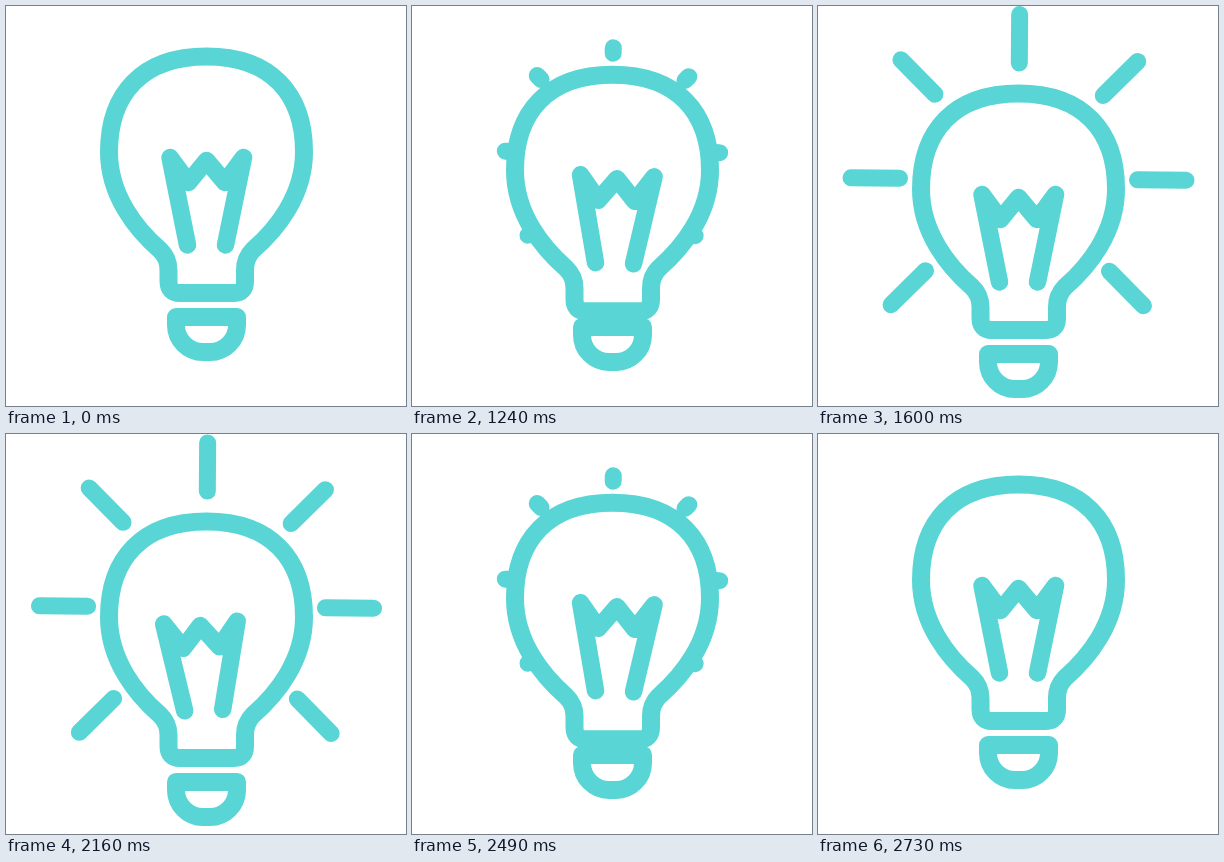
An HTML page that plays this animation: 400x400 px, repeating every 2760 ms.

```html
<!DOCTYPE html>
<html lang="en">
<head>
<meta charset="utf-8">
<title>Light bulb</title>
<style>
  html, body { margin: 0; width: 100%; height: 100%; overflow: hidden; background: #fff; }
  svg { display: block; width: 100%; height: 100%; }
  path { fill: none; stroke: #58d5d4; stroke-width: 18; stroke-linecap: round; stroke-linejoin: round; }
  #rays { stroke-width: 17; }
  #filament { stroke-width: 17.5; }
  #glass { fill: #fff; }
</style>
</head>
<body>
<svg viewBox="0 0 400 400">
  <path id="rays"/>
  <path id="base" d="M170 311H231V319A27 27 0 0 1 204 346H197A27 27 0 0 1 170 319Z"/>
  <g id="bulb">
    <path id="glass" d="M200.5 50.5C136 50.5 103 88 103 146C103 190 131 224 154 244
      Q162.5 252 162.5 264V275Q162.5 287 174 287H228Q239 287 239 275V264Q239 252 247 244
      C270 224 298 190 298 146C298 88 265 50.5 200.5 50.5Z"/>
    <path id="filament" d="M181.5 239L164 151.5L182.5 176.5L200.5 154.5L219 176.5L237.5 151.5L219.5 239"/>
  </g>
</svg>
<script>
  const LOOP = 2760, STEP = 30, STEPS = 20, DROP = 37;
  const OPEN_AT = 1000, CLOSE_AT = 2130;
  const CENTER = { x: 200.5, y: 136 };
  // direction in degrees and extra distance from the centre
  const RAYS = [[-180, 0], [-135, 0], [-90, -3], [-45, 0], [0, 0], [45, 10.5], [135, 11.5]];

  const [rays, base, bulb, filament] =
    ['rays', 'base', 'bulb', 'filament'].map(id => document.getElementById(id));

  const clamp = (v, lo, hi) => Math.min(hi, Math.max(lo, v));
  const smooth = p => p * p * (3 - 2 * p);
  const easeInOut = (p, n) => p < 0.5 ? (2 * p) ** n / 2 : 1 - (2 - 2 * p) ** n / 2;
  const stepsSince = (t, start) => clamp(Math.floor((t - start) / STEP), 0, STEPS);

  // Rays shoot out from the centre, slowing down, hidden by the glass at first.
  function rayPath(p, dy) {
    const left = (1 - p) ** 2;
    const outer = 167.5 * (1 - left);
    const inner = Math.min(outer, 119 - 48 * left);
    return RAYS.map(([deg, extra]) => {
      const a = (deg + 0.4) * Math.PI / 180;
      const point = r =>
        `${CENTER.x + (r + extra) * Math.cos(a)} ${CENTER.y + dy + (r + extra) * Math.sin(a)}`;
      return `M${point(inner)}L${point(outer)}`;
    }).join('');
  }

  function draw(now) {
    const t = now % LOOP;
    const u = stepsSince(t, OPEN_AT) - stepsSince(t, CLOSE_AT);
    const p = u / STEPS;
    const bulbDrop = DROP * smooth(Math.min(1, u / 13) ** 1.45);
    const baseDrop = DROP * easeInOut(p, 2.8);
    const tilt = (0.94 + 2 * p) * Math.sin(6 * Math.PI * p);

    bulb.setAttribute('transform', `translate(0 ${bulbDrop})`);
    base.setAttribute('transform', `translate(0 ${baseDrop})`);
    filament.setAttribute('transform', `rotate(${tilt} 200.5 309)`);
    rays.setAttribute('d', rayPath(p, baseDrop));
  }

  const start = performance.now();
  function tick() {
    draw(performance.now() - start);
    requestAnimationFrame(tick);
  }
  tick();
</script>
</body>
</html>
```
